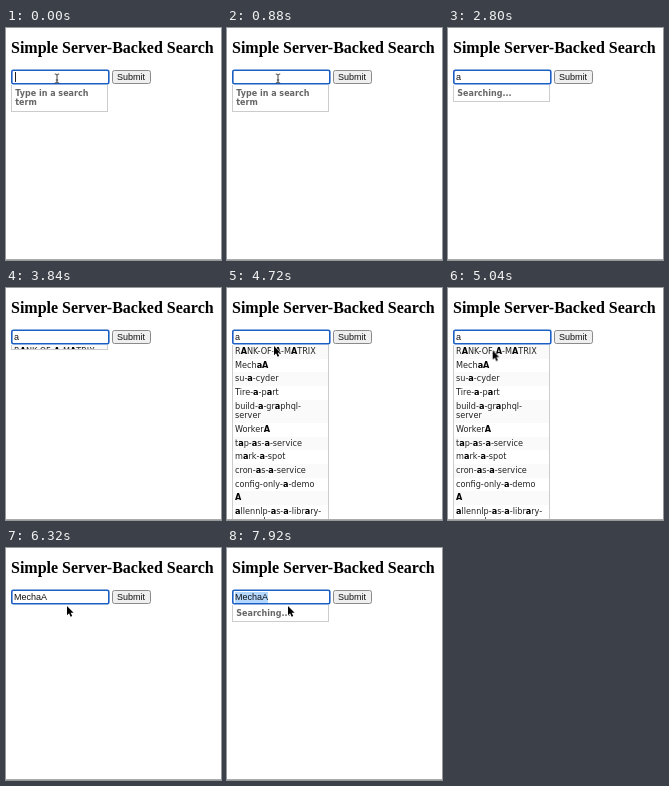
Recreate the animation shown at these times as an HTML page. Size 215 by 232 pixels, loop 8000 ms.

```html
<!DOCTYPE html>
<html lang="en">
<head>
<meta charset="utf-8">
<title>Simple Server-Backed Search</title>
<style>
html, body { margin: 0; width: 215px; height: 232px; overflow: hidden; background: #fff; }
body { position: relative; color: #000; }
body > *, .mouse svg { position: absolute; }
h1 { left: 5px; top: 11px; margin: 0; font: bold 16px/18px "Liberation Serif", serif; white-space: nowrap; }
.frame { left: 0; top: 0; }
.ui { top: 42px; font: 9px/14px "Liberation Sans", sans-serif; color: #111; }
.value { left: 8px; }
.submit { left: 111px; }
.caret { top: 44px; width: 1px; height: 10px; background: #222; }
.mark { left: 8px; top: 44px; width: 33px; height: 11px; background: #b3d7fe; }

.drop {
  left: 5px; top: 57px; width: 97px; box-sizing: border-box; margin: 0; overflow: hidden;
  border: 1px solid #ccc; border-top: 0; background: #fff;
  font: 8.15px/9.67px "DejaVu Sans", sans-serif; white-space: pre; list-style: none;
}
.note { padding: 3.5px 3.3px 3px; font-size: 8px; font-weight: bold; color: #666; }
.list { padding: 0; color: #222; }
.list li { padding: 2px; }
.list li:nth-child(odd) { background: #fafafa; }
.list b { color: #000; }
.base { left: 0; top: 231px; width: 215px; height: 1px; background: #aaa; }

/* Everything shares one 8 s clock */
.hint, .wait, .list, .mark, .one, .full, .c0, .c1, .c2, .beam, .arrow {
  visibility: hidden; animation: 8s step-end infinite;
}
.hint { animation-name: hint; }
.wait { animation-name: wait; }
.mark { animation-name: mark; }
.one  { animation-name: one; }
.full { animation-name: full; }
.c0 { left: 9px; animation-name: c0; }
.c1 { left: 13px; animation-name: c1; }
.c2 { left: 41px; animation-name: c2; }
.beam { animation-name: beam; }
.arrow { animation-name: arrow; }
.list { animation: list 8s step-end infinite, slide 8s linear infinite; }
.mouse { left: 0; top: 0; animation: move 8s ease-in-out infinite; }

@keyframes hint { 0% { visibility: visible } 14.375%, 100% { visibility: hidden } }
@keyframes wait {
  0%, 47.75% { visibility: hidden }
  14.375%, 81%, 100% { visibility: visible }
}
@keyframes list { 0%, 67.5%, 100% { visibility: hidden } 47.75% { visibility: visible } }
@keyframes slide {
  0% { height: 0 }
  47.75% { height: 0; animation-timing-function: cubic-bezier(.37, 0, .63, 1) }
  50.25%, 100% { height: 190px }
}
@keyframes mark { 0% { visibility: hidden } 81%, 100% { visibility: visible } }
@keyframes one { 0%, 67.5%, 100% { visibility: hidden } 14.375% { visibility: visible } }
@keyframes full { 0% { visibility: hidden } 67.5%, 100% { visibility: visible } }
@keyframes c0 {
  0%, 11.25% { visibility: visible }
  5%, 14.375%, 100% { visibility: hidden }
}
@keyframes c1 {
  0%, 20.625%, 33.125%, 45.625%, 58.125%, 67.5%, 100% { visibility: hidden }
  14.375%, 26.875%, 39.375%, 51.875%, 64.375% { visibility: visible }
}
@keyframes c2 {
  0%, 73.75%, 81%, 100% { visibility: hidden }
  67.5%, 80% { visibility: visible }
}
@keyframes beam {
  0%, 55.5% { visibility: visible }
  14.375%, 57.8%, 100% { visibility: hidden }
}
@keyframes arrow { 0% { visibility: hidden } 57.8%, 100% { visibility: visible } }
@keyframes move {
  0%, 55.5% { transform: translate(51px, 50px) }
  59%, 61% { transform: translate(47px, 58px) }
  66%, 70.8% { transform: translate(40px, 71px) }
  77%, 100% { transform: translate(61px, 58px) }
}
</style>
</head>
<body>
<h1>Simple Server-Backed Search</h1>

<svg class="frame" width="215" height="60">
  <rect x="5.8" y="42.3" width="97" height="13.4" rx="1.5" fill="#fff" stroke="#1c5fc4" stroke-width="1.6"/>
  <rect x="106.5" y="42.5" width="38" height="13" rx="2" fill="#efefef" stroke="#8a8a8a"/>
</svg>

<div class="mark"></div>
<div class="ui value one">a</div>
<div class="ui value full">MechaA</div>
<div class="caret c0"></div>
<div class="caret c1"></div>
<div class="caret c2"></div>
<div class="ui submit">Submit</div>

<div class="drop note hint">Type in a search
term</div>
<div class="drop note wait">Searching...</div>
<ul class="drop list"><li>R<b>A</b>NK-OF-<b>A</b>-M<b>A</b>TRIX</li><li>Mech<b>aA</b></li><li>su-<b>a</b>-cyder</li><li>Tire-<b>a</b>-p<b>a</b>rt</li><li>build-<b>a</b>-gr<b>a</b>phql-
server</li><li>Worker<b>A</b></li><li>t<b>a</b>p-<b>a</b>s-<b>a</b>-service</li><li>m<b>a</b>rk-<b>a</b>-spot</li><li>cron-<b>a</b>s-<b>a</b>-service</li><li>config-only-<b>a</b>-demo</li><li><b>A</b></li><li><b>a</b>llennlp-<b>a</b>s-<b>a</b>-libr<b>a</b>ry-
ex<b>a</b>mple</li></ul>

<div class="base"></div>

<div class="mouse">
  <svg class="beam" width="8" height="12" style="left:-4px;top:-5px" fill="none" stroke="#333" stroke-width=".9">
    <path d="M1.8 1Q4 1 4 2.2Q4 1 6.2 1M4 2V9M1.8 10Q4 10 4 8.8Q4 10 6.2 10M2.8 7H5.2"/>
  </svg>
  <svg class="arrow" width="10" height="14" style="left:-1px;top:-1px">
    <path d="M1 1V10.3L3.1 8.3L4.6 11.8L6.2 11.1L4.7 7.7H7.6Z" stroke="#fff" stroke-width="1.2" paint-order="stroke"/>
  </svg>
</div>
</body>
</html>
```
